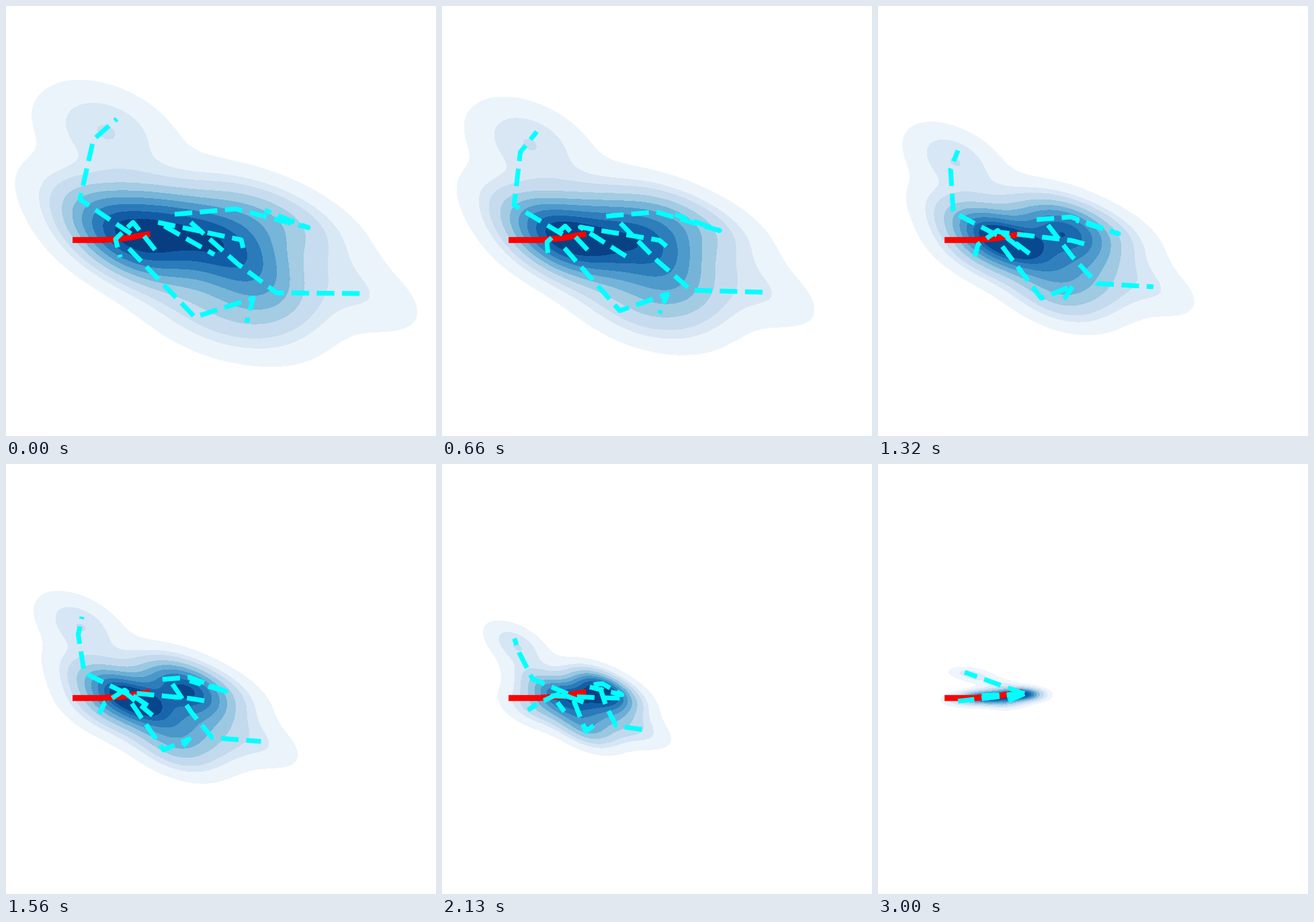
Animation, 640 px wide and 640 px high, one loop 3030 ms. Source, as a matplotlib script:

```python
import numpy as np
import matplotlib.pyplot as plt
from matplotlib.animation import FuncAnimation

SIZE, FRAMES, GRID = 640, 101, 200

# Path points at full noise and about halfway through the denoising
NOISY = np.array([
    [(186, 339), (110, 288), (130, 199), (165, 168)],
    [(222, 363), (189, 322), (163, 347), (170, 374)],
    [(183, 361), (281, 463), (368, 435), (358, 471)],
    [(275, 322), (345, 384), (403, 427), (530, 428)],
    [(251, 310), (342, 302), (450, 330), (385, 304)],
    [(353, 360), (350, 348), (226, 322), (310, 370)],
])
MIDWAY = np.array([
    [(177, 341), (112, 307), (108, 243), (119, 215)],
    [(212, 361), (178, 334), (149, 355), (144, 373)],
    [(185, 358), (243, 435), (291, 416), (277, 436)],
    [(253, 326), (289, 373), (326, 413), (410, 418)],
    [(236, 318), (287, 314), (358, 339), (295, 319)],
    [(307, 354), (288, 349), (184, 337), (234, 375)],
])
# Settled paths run almost straight from one start to their own ends
START = np.array([218, 342])
ENDS = np.array([(129, 310), (119, 353), (146, 350),
                 (183, 357), (146, 345), (145, 349)])
STEPS = np.array([0, 0.4, 0.75, 1])
CLEAN = START + STEPS[:, None] * (ENDS - START)[:, None]

TRUTH = np.array([(103.5, 348.3), (145, 348.3), (178, 345.5), (210, 340)])


def basis(s):
    """Constant, signal and noise weights of a linear beta schedule."""
    alpha = np.exp(-2.5 * s**2)
    return np.array([1, np.sqrt(alpha), np.sqrt(1 - alpha)])


poses = np.stack([NOISY, MIDWAY, CLEAN])
to_weights = np.linalg.inv([basis(s) for s in (1, 0.56, 0)])


def paths_at(s):
    return np.tensordot(basis(s) @ to_weights, poses, 1)


def density(pts, cut=3):
    """Gaussian KDE with Scott's bandwidth on a regular grid."""
    cov = np.cov(pts.T) * len(pts) ** (-1 / 3)
    pad = cut * np.sqrt(np.diag(cov))
    xs, ys = np.linspace(pts.min(0) - pad, pts.max(0) + pad, GRID).T
    (a, b), (_, c) = np.linalg.inv(cov)
    z = np.zeros((GRID, GRID))
    for px, py in pts:
        dx, dy = xs[None, :] - px, ys[:, None] - py
        z += np.exp(-0.5 * (a * dx**2 + c * dy**2) - b * dx * dy)
    return xs, ys, z


def mass_levels(z, n=10, thresh=0.05):
    """Density values that enclose evenly spaced shares of the mass."""
    vals = np.sort(z.ravel())[::-1]
    cdf = np.cumsum(vals) / vals.sum()
    return vals[np.searchsorted(cdf, 1 - np.linspace(thresh, 1, n))]


fig = plt.figure(figsize=(SIZE / 100, SIZE / 100), dpi=100, facecolor="white")
ax = fig.add_axes([0, 0, 1, 1])
ax.set(xlim=(0, SIZE), ylim=(SIZE, 0), autoscale_on=False)
ax.axis("off")

ax.plot(*TRUTH.T, color="red", lw=6.4, zorder=3)
lines = [ax.plot([], [], "--", color="cyan", lw=5.1, zorder=4)[0] for _ in ENDS]
fills = []


def draw(i):
    while fills:
        fills.pop().remove()
    paths = paths_at(1 - i / (FRAMES - 1))
    xs, ys, z = density(paths.reshape(-1, 2))
    fills.append(ax.contourf(xs, ys, z, levels=mass_levels(z), cmap="Blues", zorder=1))
    for line, path in zip(lines, paths):
        line.set_data(*path.T)
    return lines


anim = FuncAnimation(fig, draw, frames=FRAMES, init_func=lambda: lines,
                     interval=30, repeat=True, repeat_delay=0, blit=False)
plt.show()
```
